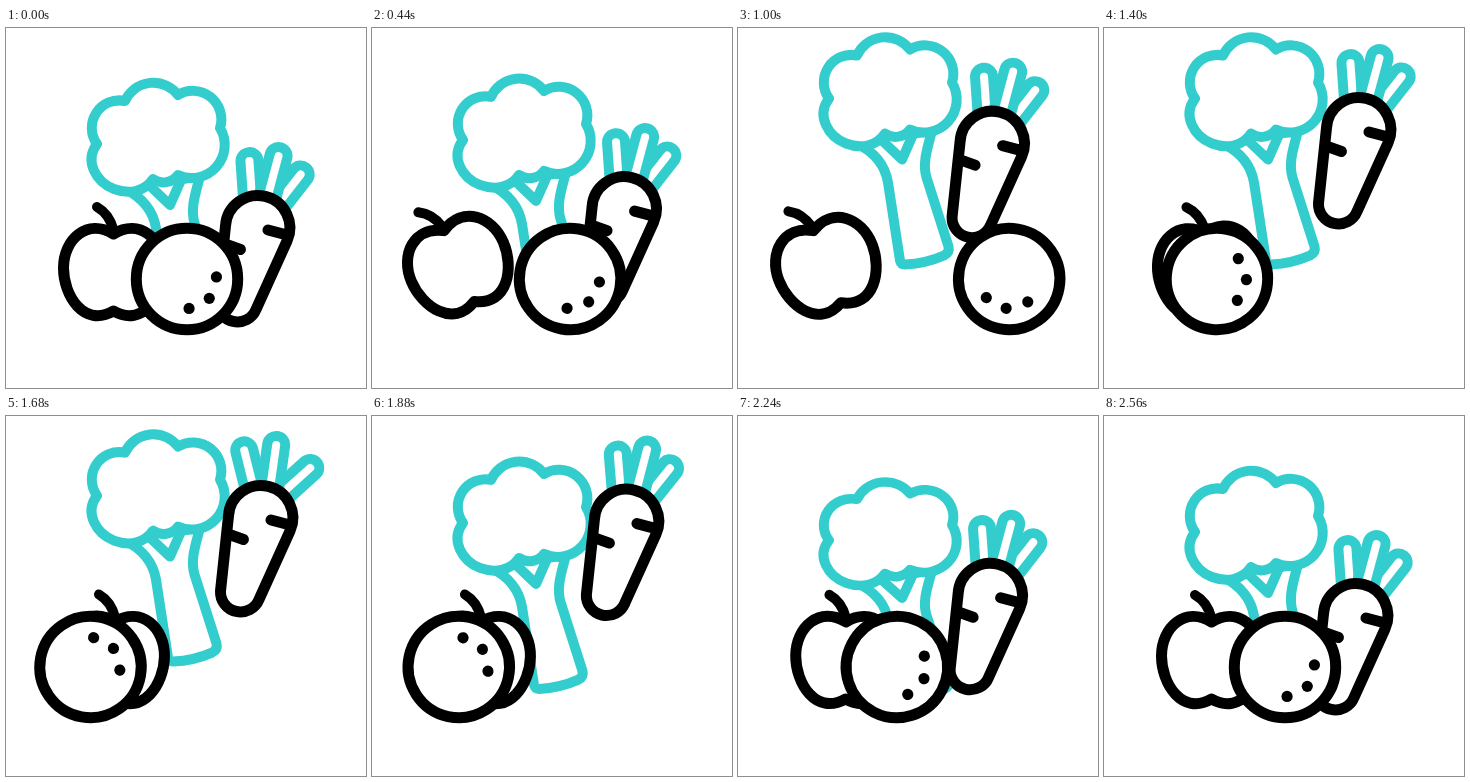
These frames come from a looping animation (360 px wide and 360 px high, 3000 ms). An HTML page with a canvas:

```html
<!DOCTYPE html>
<html lang="en">
<head>
<meta charset="utf-8">
<title>Fruit and vegetables</title>
<style>
html, body { margin: 0; width: 100%; height: 100%; overflow: hidden; background: #fff; }
canvas { display: block; width: 360px; height: 360px; }
</style>
</head>
<body>
<canvas id="stage" width="360" height="360"></canvas>
<script>
const canvas = document.getElementById('stage');
const ctx = canvas.getContext('2d');
const ratio = window.devicePixelRatio || 1;
canvas.width = canvas.height = 360 * ratio;

const LOOP = 3000, STEP = 40;
const TEAL = '#34cdce', BLACK = '#000';
const RAD = Math.PI / 180;

const cubic = u => u < .5 ? 4 * u ** 3 : 1 - 4 * (1 - u) ** 3;
const sine = u => (1 - Math.cos(Math.PI * u)) / 2;
const launch = u => sine(u ** .72);

// Each move is [start, end, target value, easing].
function track(t, start, moves) {
  let value = start;
  for (const [from, to, target, ease = cubic] of moves) {
    if (t <= from) break;
    value += (target - value) * ease(Math.min(1, (t - from) / (to - from)));
  }
  return value;
}

function shape(path, color, width, fill = true) {
  const p = new Path2D(path);
  if (fill) {
    ctx.fillStyle = '#fff';
    ctx.fill(p);
  }
  ctx.strokeStyle = color;
  ctx.lineWidth = width;
  ctx.stroke(p);
}

function placed(x, y, angle, draw) {
  ctx.save();
  ctx.translate(x, y);
  ctx.rotate(angle * RAD);
  draw();
  ctx.restore();
}

function broccoli(t) {
  const ground = 281;
  const lift = track(t, 0, [[220, 1000, -45.5], [1400, 2160, 0]]);
  const squash = track(t, 0, [[1900, 2120, .06, sine], [2120, 2560, 0, sine]]);
  ctx.save();
  ctx.translate(0, ground + lift);
  ctx.scale(1, 1 - squash);
  ctx.translate(0, -ground);
  shape('M119 161C135 169 147 182 150 200L162 278Q163 282 167 282Q188 281 206 273Q212 270 210.5 264' +
    'L188.5 195C184 180 190 164 194 148Z', TEAL, 10);
  shape('M142 156L164 177L175 152', TEAL, 10);
  shape('M119 73A31 31 0 0 1 172 67A28.5 28.5 0 0 1 214 100A33 33 0 0 1 172 147A18 18 0 0 1 147 151' +
    'C139 163 124 167 108 161C90 154 78 133 91 116A27.5 27.5 0 0 1 119 73Z', TEAL, 10);
  ctx.restore();
}

function leaf(x, y, angle, length) {
  placed(x, y, angle, () =>
    shape(`M-9 0V${-length}A9 9 0 0 1 9 ${-length}V0`, TEAL, 10));
}

function carrot(t) {
  const rise = track(t, 0, [[240, 1360, 1, launch], [1700, 2560, 0]]);
  const spread = track(t, 0, [[1440, 1680, 1, sine], [1680, 1920, 0, sine]]);
  const grow = 2 * spread;
  placed(3 * rise, -98 * rise, 0, () => {
    leaf(246.6, 178, -4 - 10 * spread, 45 + grow);
    leaf(270, 178, 38 + 10 * spread, 40 + grow);
    leaf(261, 171, 15 - 7 * spread, 44.5);
    shape('M219.5 198A32.2 32.2 0 1 1 281 213L250 281.5A20 20 0 0 1 211.5 273Z', BLACK, 11);
    shape('M262 202L281 207M219 216L234.5 221.5', BLACK, 11, false);
  });
}

function apple(t) {
  const angle = track(t, 0, [
    [220, 500, -24], [500, 680, -21, sine], [900, 1720, 1], [1720, 2560, 0]
  ]);
  const x = 107.5 + angle * RAD * 50;
  const y = 245 - Math.abs(angle) * .28;
  placed(x, y, angle, () => {
    shape('M0 -39C-26 -55 -50 -34 -50 -5C-50 22 -30 55 0 38' +
      'C30 55 50 22 50 -5C50 -34 26 -55 0 -39Z', BLACK, 11);
    shape('M-16.5 -66Q-4 -59 0 -43', BLACK, 10, false);
  });
}

function orange(t) {
  const x = track(t, 181, [[220, 840, 276.5], [840, 1680, 84.5], [1730, 2560, 181]]);
  const spin = track(t, 0, [[220, 840, 55], [960, 1720, -80], [1720, 2560, 0]]);
  placed(x, 251, spin, () => {
    shape('M50.7 0A50.7 50.7 0 1 1 -50.7 0A50.7 50.7 0 1 1 50.7 0Z', BLACK, 11);
    ctx.fillStyle = BLACK;
    for (const angle of [-4, 41, 86]) {
      ctx.beginPath();
      ctx.arc(29.5 * Math.cos(angle * RAD), 29.5 * Math.sin(angle * RAD), 5.6, 0, 2 * Math.PI);
      ctx.fill();
    }
  });
}

function render(now) {
  const t = Math.floor((now % LOOP) / STEP) * STEP;
  ctx.setTransform(ratio, 0, 0, ratio, 0, 0);
  ctx.fillStyle = '#fff';
  ctx.fillRect(0, 0, 360, 360);
  ctx.lineCap = ctx.lineJoin = 'round';
  broccoli(t);
  carrot(t);
  apple(t);
  orange(t);
}

let origin;
function tick(now) {
  origin ??= now;
  render(now - origin);
  requestAnimationFrame(tick);
}
render(0);
requestAnimationFrame(tick);
</script>
</body>
</html>
```
